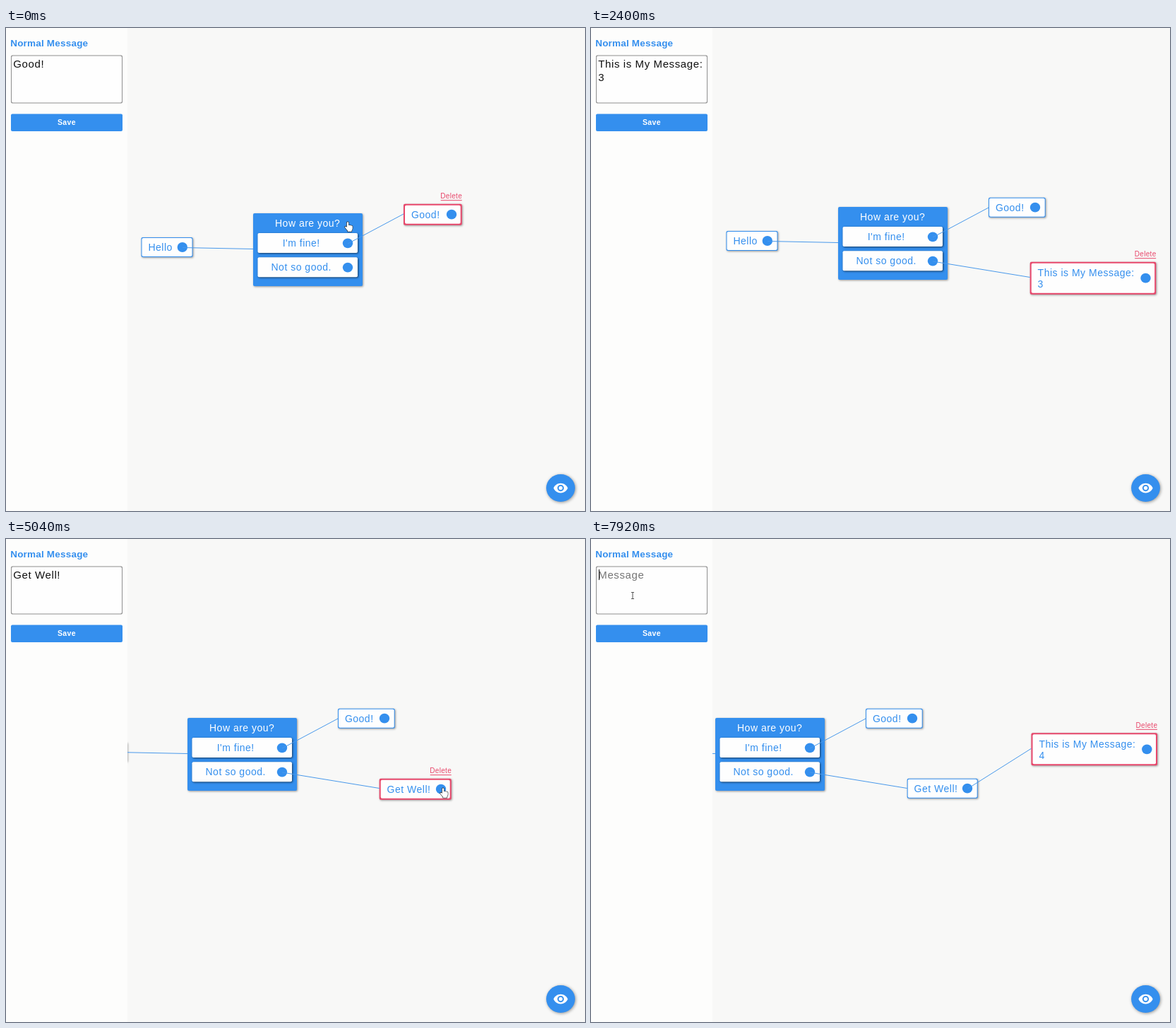
These frames come from a looping animation (820 by 683 pixels, 8000 ms). An HTML page with a canvas:

```html
<!DOCTYPE html>
<html lang="en">
<head>
<meta charset="utf-8">
<title>Message flow editor</title>
<style>
  html, body { margin: 0; width: 100%; height: 100%; overflow: hidden; background: #f8f8f7; }
  canvas { display: block; }
</style>
</head>
<body>
<canvas id="stage" width="820" height="683"></canvas>
<script>
const ctx = document.getElementById('stage').getContext('2d');
const LOOP = 8000, PANEL = 172;
const BLUE = '#348fee', RED = '#e8486c', FONT = '"Liberation Sans", Arial, sans-serif';
const EYE = new Path2D('M12 4.5C7 4.5 2.73 7.61 1 12c1.73 4.39 6 7.5 11 7.5s9.27-3.11 11-7.5c-1.73-4.39-6-7.5-11-7.5z' +
  'M12 17c-2.76 0-5-2.24-5-5s2.24-5 5-5 5 2.24 5 5-2.24 5-5 5zm0-8c-1.66 0-3 1.34-3 3s1.34 3 3 3 3-1.34 3-3-1.34-3-3-3z');
const HAND = new Path2D('M-2.2-6.2q1.3-1.2 2.4 0v4.2q1.3-.6 2 .2 1.2-.5 1.9.4 1.4-.3 1.6 1v3.2q-.2 1.6-1.2 2.6v1.4h-5.6v-1.2q-2.2-2.4-4-5.2 1-1.7 2.9.4z');
const GRAB = new Path2D('M-3.4 1v-5q1-1.3 1.9 0 .8-2 1.9-.6 1.2-1.2 2 .5 1.6-.9 2 .8v4.8q0 2-1.2 3.4v1.6h-5.6v-1.2q-2-2-3.4-4.6 .9-1.6 2.4.3z');
const ARROW = new Path2D('M-2-5v9.6l2.2-2 1.6 3.5 1.6-.7-1.6-3.4h3z');

// Keys: time, x, y
const mousePath = [[0, 485, 281], [250, 485, 281], [800, 486, 337], [980, 486, 337], [1440, 623, 354],
  [1660, 623, 354], [1960, 668, 356], [2240, 668, 356], [2640, 60, 78], [3460, 60, 78], [3700, 90, 136],
  [3860, 90, 136], [4200, 597, 292], [4640, 597, 292], [5000, 620, 359], [5180, 620, 359], [5660, 706, 298],
  [5840, 706, 298], [6180, 749, 300], [7000, 749, 300], [7440, 59, 80]];
const scrollX = [[4120, 0], [4240, 15], [4720, 93], [6640, 93], [7040, 174]];
const scrollY = [[80, 9], [480, 0]];
const presses = [[900, 1600], [2000, 2160], [2680, 2800], [3720, 3860], [5100, 5760], [6300, 6480], [7480, 7620]];
const drags = [[900, 1660], [5100, 5800]];

const within = (t, spans) => spans.find(([a, b]) => t >= a && t < b);

function at(keys, t) {
  const i = keys.findIndex(k => k[0] > t);
  if (i < 0) return keys[keys.length - 1].slice(1);
  if (i === 0) return keys[0].slice(1);
  const a = keys[i - 1], b = keys[i];
  const u = (t - a[0]) / (b[0] - a[0]), e = u * u * (3 - 2 * u);
  return a.slice(1).map((v, n) => v + (b[n + 1] - v) * e);
}

function text(s, x, y, size, color, gap, align = 'left', weight = '') {
  ctx.font = `${weight} ${size}px ${FONT}`;
  ctx.letterSpacing = gap + 'px';
  ctx.textAlign = align;
  ctx.fillStyle = color;
  ctx.fillText(s, x, y);
}

function box(x, y, w, h, fill, shadow) {
  ctx.save();
  if (shadow) {
    ctx.shadowColor = shadow;
    ctx.shadowBlur = 3;
    ctx.shadowOffsetX = ctx.shadowOffsetY = 1;
  }
  ctx.fillStyle = fill;
  ctx.beginPath();
  ctx.roundRect(x, y, w, h, 2);
  ctx.fill();
  ctx.restore();
}

function ellipse(x, y, rx, ry) {
  ctx.beginPath();
  ctx.ellipse(x, y, rx, ry, 0, 0, 7);
}

function dot(x, y) {
  ellipse(x, y, 7.2, 6.9);
  ctx.fillStyle = BLUE;
  ctx.fill();
}

function line(x1, y1, x2, y2, color = '#4999eb') {
  ctx.strokeStyle = color;
  ctx.lineWidth = 1;
  ctx.beginPath();
  ctx.moveTo(x1, y1);
  ctx.lineTo(x2, y2);
  ctx.stroke();
}

// (x, y) is the middle of the left edge; width is that of the unselected box
function node(x, y, width, lines, selected) {
  const b = selected ? 2 : 1;
  const w = width + 2 * b - 2, h = 12 + 16 * lines.length + 2 * b - 2, top = y - 6 - 8 * lines.length;
  box(x, top, w, h, selected ? RED : BLUE, 'rgba(0,0,0,.4)');
  box(x + b, top + b, w - 2 * b, h - 2 * b, '#fefefe');
  lines.forEach((s, i) => text(s, x + b + 8.9, top + b + 18.3 + 16 * i, 14, BLUE, .5));
  dot(x + w - 14.7, top + h / 2);
  if (!selected) return;
  text('Delete', x + w + .3, top - 7.5, 10, RED, .3, 'right');
  line(x + w - 30, top - 5, x + w, top - 5, RED);
}

function question(x, y) {
  box(x, y, 155, 103, BLUE, 'rgba(0,0,0,.4)');
  text('How are you?', x + 77.2, y + 19, 14, '#fff', .5, 'center');
  ["I'm fine!", 'Not so good.'].forEach((s, i) => {
    const top = y + 28 + 34.3 * i;
    box(x + 6.5, top, 141.5, 28, '#fefefe', 'rgba(0,0,0,.6)');
    text(s, x + 68.2, top + 19, 14, BLUE, .5, 'center');
    dot(x + 134, top + 14.3);
  });
}

function flow(t) {
  const [sx] = at(scrollX, t), [sy] = at(scrollY, t), [mx, my] = at(mousePath, t);
  const renamed = t >= 3800;
  ctx.save();
  ctx.beginPath();
  ctx.rect(PANEL, 0, 820, 683);
  ctx.clip();
  ctx.translate(-sx, sy);
  node(191.5, 301, 73, ['Hello']);
  question(350, 253);
  node(563, 253.7, 80.7, ['Good!'], t < 2020);
  if (t >= 1640) {
    node(621.7, 352.7, renamed ? 100 : 176.5, renamed ? ['Get Well!'] : ['This is My Message:', '3'], t >= 2020 && t < 6320);
  }
  if (t >= 5780) node(797.5, 296.3, 176.5, ['This is My Message:', '4'], t >= 6320);
  line(250, 301.5, 350, 303.5);
  line(484, 296, 563, 254);
  if (t >= 1640) line(484, 330, 621.7, 352.5);
  else if (t > 980) line(484, 330, mx - 1, my - 1.5);
  if (t >= 5780) line(707.5, 353, 797.5, 296.3);
  else if (t > 5180) line(708.5, 354, mx + sx - 1, my - 1.5);
  ctx.restore();
  if (within(t, [[4120, 4860], [6640, 7240]])) {
    ctx.fillStyle = '#7e7e7e';
    ctx.beginPath();
    ctx.roundRect(174 + sx * .6, 678, 900, 5.5, 2.7);
    ctx.fill();
  }
}

function draft(t) {
  if (t < 2020) return ['Good!'];
  if (t < 2820) return ['This is My Message:', '3'];
  if (t < 6320) return ['Get Well!'.slice(0, Math.max(0, Math.floor((t - 2840) / 65)))];
  if (t < 7780) return ['This is My Message:', '4'];
  return [''];
}

function panel(t) {
  ctx.fillStyle = '#fdfdfc';
  ctx.fillRect(0, 0, PANEL, 683);
  text('Normal Message', 6.2, 25.7, 13.5, BLUE, .2, 'left', 'bold');
  box(7, 38.5, 158, 68, '#8f8f8f');
  box(8, 39.5, 156, 66, '#fefefe');
  const lines = draft(t), last = lines.length - 1;
  if (lines[0]) lines.forEach((s, i) => text(s, 10.3, 56 + 19 * i, 15, '#111', .6));
  else text('Message', 10.3, 56, 15, '#757575', .6);
  if (within(t, [[2700, 3720], [7500, LOOP]])) {
    ctx.font = `15px ${FONT}`;
    ctx.letterSpacing = '.6px';
    ctx.fillStyle = '#111';
    ctx.fillRect(11 + ctx.measureText(lines[last]).width, 43 + 19 * last, 1, 15);
  }
  box(7, 121.5, 158, 24.5, BLUE);
  text('Save', 86, 137.2, 10.5, '#fff', .4, 'center', 'bold');
}

function eyeButton() {
  ctx.save();
  ctx.shadowColor = 'rgba(0,0,0,.4)';
  ctx.shadowBlur = 4;
  ctx.shadowOffsetX = ctx.shadowOffsetY = 1;
  ellipse(785.5, 650.5, 20.4, 19.5);
  ctx.fillStyle = BLUE;
  ctx.fill();
  ctx.restore();
  ctx.save();
  ctx.translate(785.5 - 11, 650.5 - 11);
  ctx.scale(.92, .92);
  ctx.fillStyle = '#fff';
  ctx.fill(EYE, 'evenodd');
  ctx.restore();
}

function icon(path, fill, stroke) {
  ctx.lineWidth = 1.2;
  ctx.lineJoin = 'round';
  ctx.strokeStyle = stroke;
  ctx.fillStyle = fill;
  ctx.stroke(path);
  ctx.fill(path);
}

function pointer(t) {
  const [mx, my] = at(mousePath, t);
  if (within(t, presses)) {
    ellipse(mx + .5, my + .5, 27.3, 26);
    ctx.lineWidth = 3;
    ctx.strokeStyle = 'rgba(246,120,96,.8)';
    ctx.stroke();
  }
  // Hidden while typing
  if (within(t, [[2300, 2460], [2840, 3460]])) return;
  const drag = within(t, drags);
  const [x, y] = drag ? at(mousePath, drag[0]) : [mx, my];
  ctx.save();
  ctx.translate(x, y);
  if (x > 8 && x < 165 && y > 39 && y < 106) {
    line(0, -4.5, 0, 4.5, '#555');
    line(-2, -4.5, 2, -4.5, '#555');
    line(-2, 4.5, 2, 4.5, '#555');
  } else if (within(t, [[1960, 2240], [6180, 7000]])) {
    icon(GRAB, '#fff', '#222');
  } else if (t < 1700 || within(t, [[3620, 3880], [4920, 5860]])) {
    icon(HAND, '#fff', '#222');
  } else {
    icon(ARROW, '#111', '#fff');
  }
  ctx.restore();
}

function frame(now) {
  const t = now % LOOP;
  ctx.fillStyle = '#f8f8f7';
  ctx.fillRect(0, 0, 820, 683);
  flow(t);
  panel(t);
  eyeButton();
  pointer(t);
  requestAnimationFrame(frame);
}
requestAnimationFrame(frame);
</script>
</body>
</html>
```
